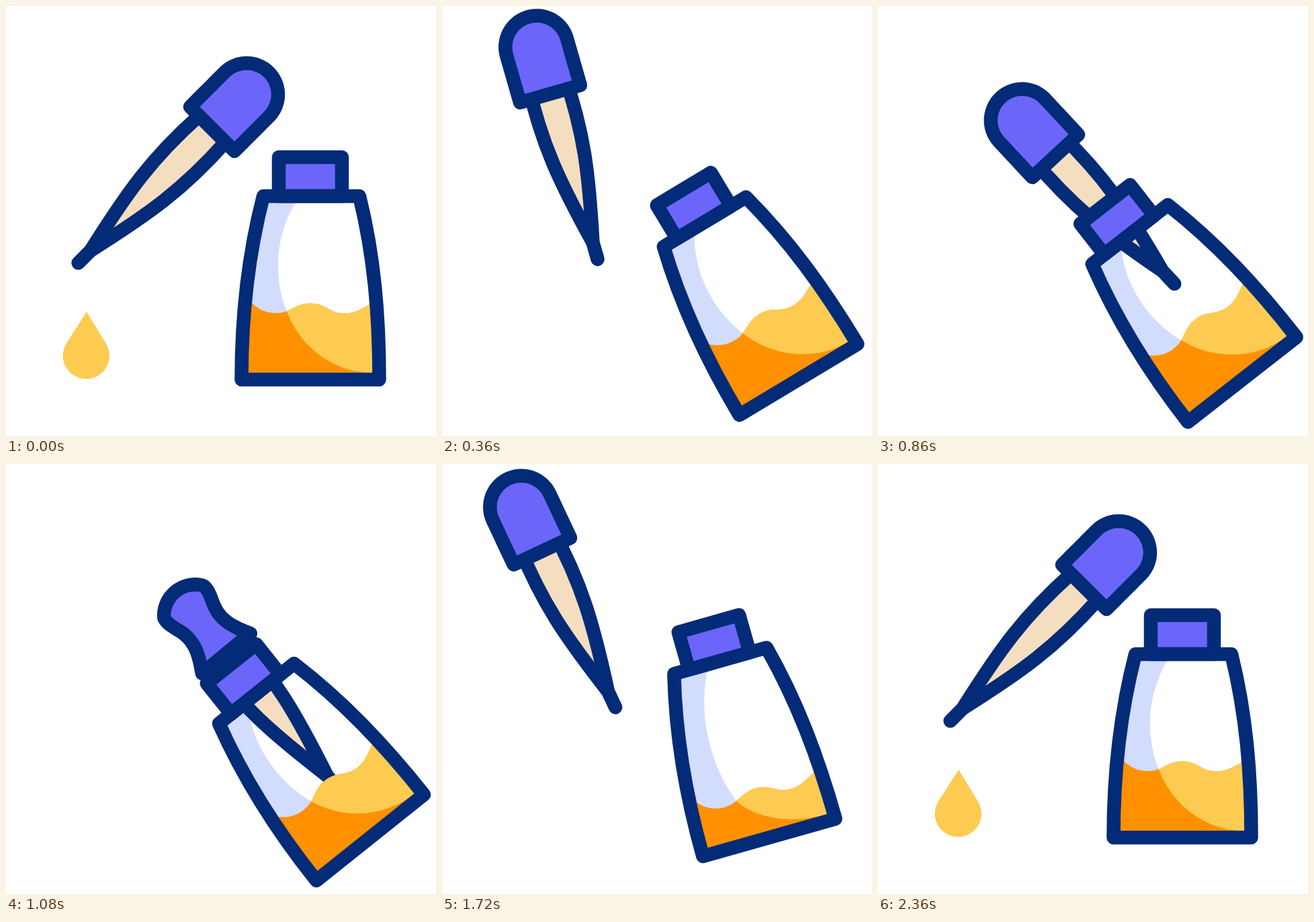
An HTML page with a canvas that plays this animation: 640 by 640 pixels, repeating every 2400 ms.

```html
<!DOCTYPE html>
<html lang="en">
<head>
<meta charset="utf-8">
<title>Dropper and bottle</title>
<style>
  html, body { margin: 0; width: 100%; height: 100%; overflow: hidden; background: #fff; }
  canvas { display: block; width: 640px; height: 640px; }
</style>
</head>
<body>
<canvas id="stage" width="640" height="640"></canvas>
<script>
const ctx = document.getElementById('stage').getContext('2d');
const LOOP = 2400;
const NAVY = '#032b77', PURPLE = '#6b66f9', BEIGE = '#f5debf';
const GLASS = '#d2dcfd', ORANGE = '#ff9100', YELLOW = '#fdcb52';

const BODY = new Path2D('M383 283C360 372 350.5 460 350.5 556H555.5C555.5 460 548 372 526 283Z');
const CAP = new Path2D('M406 283V225H500V283Z');
const TUBE = new Path2D('M-27.7 0C-33 95 -23 155 0 256C23 155 33 95 27.7 0ZM0 256V282');
const DROP = new Path2D('M120 455L89.9 502.1A34.7 34.7 0 1 0 148.7 502.1Z');
const WAVE = new Path2D('M352 430L366 442C376 452 388 457 402 457C424 457 430 442.5 453 442.5' +
  'C477 442.5 480 457.5 504 457.5C520 457.5 530 450 541 444.5L556 437V570H340V430Z');

// Eased 0 to 1 between two times.
function ease(t, from, to) {
  const p = Math.min(1, Math.max(0, (t - from) / (to - from)));
  return p * p * (3 - 2 * p);
}

// Rises over the first span, falls over the second.
const pulse = (t, up, full, down, end) => ease(t, up, full) - ease(t, down, end);

// Smooth monotone motion through [time, pose] keys; resting at both ends.
function motion(...keys) {
  const last = keys.length - 1;
  const slope = (i, c) => (keys[i + 1][1][c] - keys[i][1][c]) / (keys[i + 1][0] - keys[i][0]);
  const tangent = (i, c) => {
    if (i === 0 || i === last) return 0;
    const a = slope(i - 1, c), b = slope(i, c);
    return a * b <= 0 ? 0 : 2 * a * b / (a + b);
  };
  return t => {
    if (t >= keys[last][0]) return keys[last][1];
    let i = 0;
    while (t > keys[i + 1][0]) i++;
    const [t0, a] = keys[i], [t1, b] = keys[i + 1];
    const h = t1 - t0, p = (t - t0) / h, q = 1 - p, s = ease(p, 0, 1);
    return a.map((v, c) => v + (b[c] - v) * s
      + h * p * q * (tangent(i, c) * q - tangent(i + 1, c) * p));
  };
}

// Dropper poses: bulb base x and y, angle, how far the tube is drawn in.
const resting = [307, 183, 45, 0];
const upright = [161.3, 131, -15.8, 26];
const above = [131.5, 103.5, -50.5, 26];
const dipped = [325, 278.5, -39.5, 20];
const leaving = [188.5, 188, -60, 19];
const away = [119, 127.6, -55, 19];
const dropperAt = motion([0, resting], [360, upright], [495, above], [1080, dipped],
  [1180, dipped], [1520, leaving], [1625, away], [1745, upright], [1890, resting]);

// Bottle poses: bottom centre x, angle.
const standing = [453, 0];
const bottleAt = motion([0, standing], [360, [530.5, -31]], [640, [542, -36.6]],
  [1080, [542, -38.6]], [1505, [538, -38.6]], [1890, standing]);

const squeezeAt = t => pulse(t, 960, 1080, 1080, 1250) + pulse(t, 1820, 1940, 2120, 2300);
const levelAt = t => 37.5 * pulse(t, 1025, 1265, 2000, 2340);
const dropScaleAt = t => 1 - pulse(t, 0, 180, 2060, 2210) + 0.25 * pulse(t, 2060, 2210, 2210, 2350);

const rad = deg => deg * Math.PI / 180;

// Capsule whose sides are pinched along a sine.
function bulbPath(squeeze) {
  const R = 46.7, shoulder = 72.5, path = new Path2D();
  const point = (x, y) =>
    path.lineTo(x * (1 - 0.38 * squeeze * Math.sin(Math.PI * Math.min(1, y / 100))), -y);
  for (let y = 0; y < shoulder; y += 2.5) point(-R, y);
  for (let a = 180; a >= 0; a -= 5) point(R * Math.cos(rad(a)), shoulder + R * Math.sin(rad(a)));
  for (let y = shoulder; y >= 0; y -= 2.5) point(R, y);
  path.closePath();
  return path;
}

// Area right of the shade edge; the edge bends where it meets the liquid.
function lightPath(level) {
  const x = 418 + level * 0.08, y = 455 + level * 0.95, up = y - 285;
  const path = new Path2D();
  path.moveTo(436, 285);
  path.bezierCurveTo(400, 285 + up * 0.3, 397, 285 + up * 0.7, x, y);
  path.bezierCurveTo(x + 21, y + (546 - y) * 0.6, 490, 546, 545, 546);
  path.lineTo(580, 546);
  path.lineTo(580, 270);
  path.closePath();
  return path;
}

function scoped(draw) {
  ctx.save();
  draw();
  ctx.restore();
}

function filled(path, color) {
  ctx.fillStyle = color;
  ctx.fill(path);
}

function outlined(path, color) {
  filled(path, color);
  ctx.stroke(path);
}

function placeBottle(t) {
  const [x, angle] = bottleAt(t);
  ctx.translate(x, 556);
  ctx.rotate(rad(angle));
  ctx.translate(-standing[0], -556);
}

function drawGlass(light) {
  ctx.clip(BODY);
  filled(BODY, GLASS);
  filled(light, '#fff');
}

function drawLiquid(level, light) {
  ctx.clip(BODY);
  ctx.translate(0, level);
  ctx.clip(WAVE);
  ctx.translate(0, -level);
  filled(BODY, ORANGE);
  filled(light, YELLOW);
}

function drawDropper(t) {
  const [x, y, angle, slide] = dropperAt(t), squeeze = squeezeAt(t);
  ctx.translate(x, y);
  ctx.rotate(rad(angle));
  ctx.translate(0, 4.5 * squeeze);
  scoped(() => {
    ctx.translate(0, -slide);
    outlined(TUBE, BEIGE);
  });
  outlined(bulbPath(squeeze), PURPLE);
}

function drawDrop(t) {
  const k = dropScaleAt(t);
  if (k < 0.001) return;
  ctx.translate(119.3, 506);
  ctx.scale(k, k);
  ctx.translate(-119.3, -506);
  filled(DROP, YELLOW);
}

function render(t) {
  const level = levelAt(t), light = lightPath(level);
  ctx.fillStyle = '#fff';
  ctx.fillRect(0, 0, 640, 640);
  ctx.strokeStyle = NAVY;
  ctx.lineWidth = 20.5;
  ctx.lineJoin = ctx.lineCap = 'round';

  scoped(() => drawDrop(t));
  scoped(() => { placeBottle(t); drawGlass(light); });
  scoped(() => drawDropper(t));
  scoped(() => {
    placeBottle(t);
    scoped(() => drawLiquid(level, light));
    outlined(CAP, PURPLE);
    ctx.stroke(BODY);
  });
}

const start = performance.now();
function tick() {
  render((performance.now() - start) % LOOP);
  requestAnimationFrame(tick);
}
tick();
</script>
</body>
</html>
```
